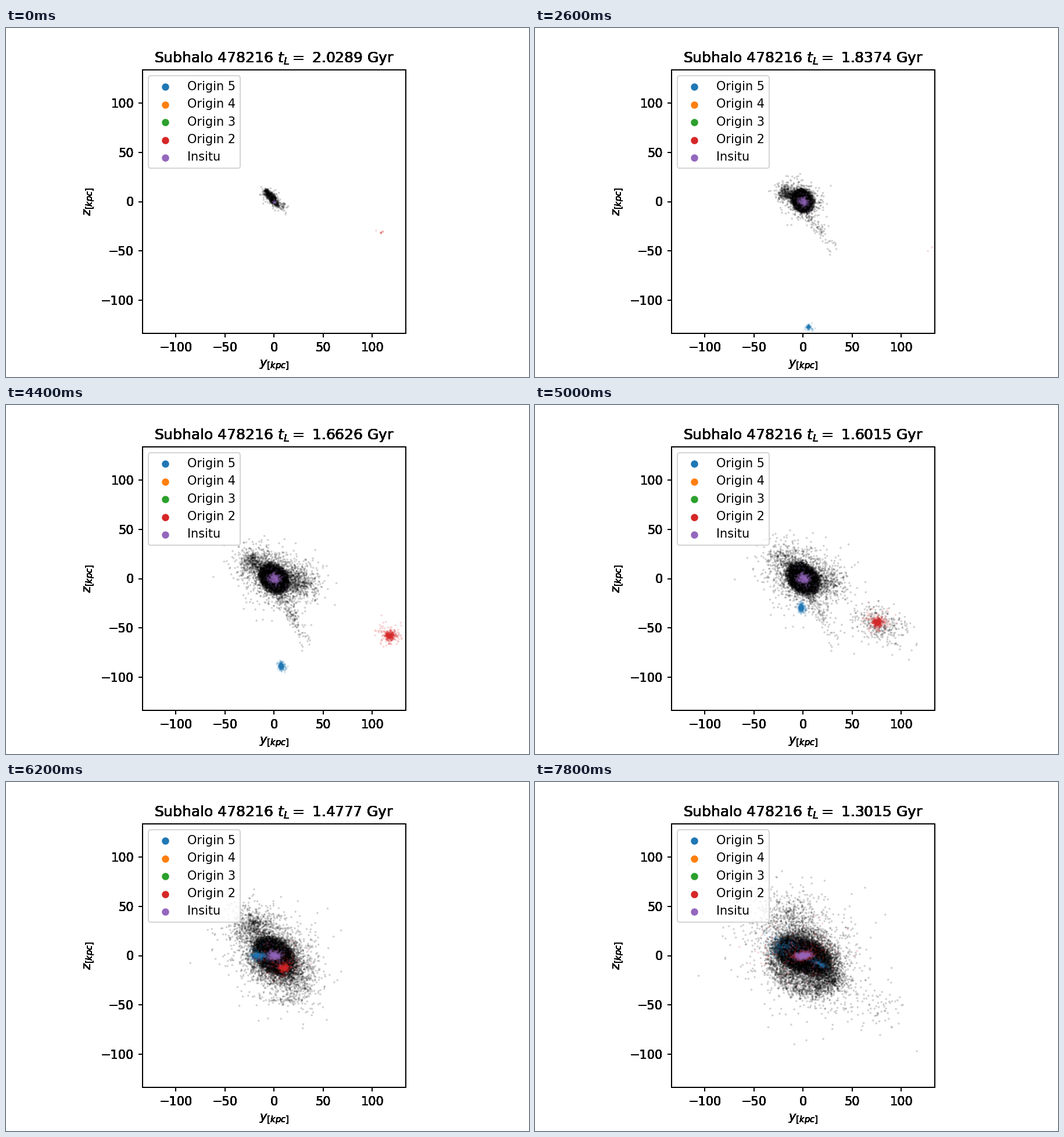
Write a matplotlib script that moves like this. It is 900 px wide and 600 px high and loops after 8 s.

```python
import numpy as np
import matplotlib.pyplot as plt
from matplotlib.animation import FuncAnimation

FRAMES, STEP_MS = 40, 200
LAST = FRAMES - 1
LIMIT = 134
PANEL = [234.75 / 900, 75 / 600, 453 / 900, 453 / 600]
TICKS = range(-100, 101, 50)
BLUE, ORANGE, GREEN, RED, PURPLE = (f"C{i}" for i in range(5))
rng = np.random.default_rng(478216)


def ease(f, start, end):
    s = np.clip((f - start) / (end - start), 0, 1)
    return s * s * (3 - 2 * s)


def bump(f, peak, width):
    return np.exp(-((f - peak) / width) ** 2)


def path(*keys):
    """Smooth curve through (frame, x, y) key points."""
    keys = np.array(keys, float)
    t, pos = keys[:, 0], keys[:, 1:]
    slope = np.gradient(pos, t, axis=0)

    def at(f):
        i = min(np.searchsorted(t, f, side="right") - 1, len(t) - 2)
        h = t[i + 1] - t[i]
        s = (f - t[i]) / h
        blend = s * s * (3 - 2 * s)
        return (pos[i] + blend * (pos[i + 1] - pos[i])
                + h * s * (1 - s) * ((1 - s) * slope[i] - s * slope[i + 1]))
    return at


class Cloud:
    """Orbiting particles; rule(f) gives count, centre, two radii and tilt."""

    def __init__(self, rule, disc=False, spin=0.05, size=8000):
        self.rule = rule
        if disc:
            self.r = rng.random(size) ** 0.6 * (1 + 0.1 * rng.standard_normal(size))
        else:
            self.r = np.hypot(*rng.standard_normal((2, size)))
            self.r *= np.exp(0.15 * rng.standard_normal(size))
        self.phase = rng.random(size) * 2 * np.pi
        self.rate = spin / (0.4 + self.r)

    def points(self, f):
        n, centre, rx, ry, tilt = self.rule(f)
        n = int(n)
        th = self.phase[:n] + self.rate[:n] * f
        u, v = rx * self.r[:n] * np.cos(th), ry * self.r[:n] * np.sin(th)
        c, s = np.cos(np.radians(tilt)), np.sin(np.radians(tilt))
        return np.column_stack([c * u - s * v, s * u + c * v]) + centre


red_path = path((0, 110, -31), (8, 137, -41), (18, 135, -61), (22, 118, -58),
                (28, 31.5, -27.5), (34, 0, -1), (39, 0, 0))
blue_path = path((0, -2, -138), (8, 0.3, -128), (18, 9.5, -117), (22, 7.5, -89),
                 (28, -11, 20), (34, -13.5, -30), (39, 17, -8))
plume_path = path((0, -6, 8), (18, -19, 11), (28, -21, 25), (39, -14, 38))


# the main galaxy and its surroundings
def body(f):
    p = f / LAST
    return (500 + 160 * f, np.array([-2.5, 4]) * (1 - p) ** 4, 11 + 19 * p**2,
            4 + 13 * p**0.6 + 4 * bump(f, 34, 3), -50 + 28 * p**3)


def shell(f):
    p = f / LAST
    return 3600 * p**5, (2 * p, -7 * p**3), 39 * p, 34 * p, -28


def halo(f):
    size = 5 + 27 * (f / LAST) ** 1.4
    return 40 + 900 * ease(f, 0, 26), (-2, 3), size, 0.8 * size, -32


def plume(f):
    size = 3 + 14 * (f / LAST) ** 2
    n = 60 + 650 * bump(f, 18, 5) + 850 * bump(f, 34, 4) + 250 * ease(f, 22, 39)
    return n, plume_path(f), size, 0.9 * size, -35


def knot(f):
    return 130 * (bump(f, 18, 4) + bump(f, 34, 3)), plume_path(f) + (-2, 5), 2.5, 2.3, 0


# debris thrown out at each close passage
def tail(f):
    reach = min(f / 18, 1)
    n = 45 + 185 * bump(f, 19, 5)
    return n, (8 + 7 * reach, -5 - 27 * reach), 3 + 15 * reach, 2.5 + reach, -25 - 37 * reach


def fan(f):
    return 800 * bump(f, 22.5, 3), (21, -3), 12, 9, -10


def flank(f):
    return 650 * ease(f, 30, 34), (25, -27 + 8 * ease(f, 34, 39)), 10, 9, -45


def arc(f):
    return 340 * bump(f, 34, 2.5), (14, -45), 14, 3, -2


def strays(f):
    return 75 * ease(f, 32, 39), (72, -50), 20, 12, -30


def escort(f):
    return 950 * ease(f, 23, 28) * (1 - ease(f, 30, 34)), red_path(f) + (2, -2), 14, 9, -22


# infalling satellites
def blue_core(f):
    p = f / LAST
    x, y = blue_path(f)
    n = 260 * ease(f, 4, 28) - 150 * ease(f, 34, 39)
    return n, (x, y), 1 + 3.5 * p**2, 1 + 0.6 * p, np.degrees(np.arctan2(y, x))


def blue_rest(f):
    spread = ease(f, 26, 36)
    n = 8 * ease(f, 3, 8) + 20 * ease(f, 8, 18) + 170 * spread
    return n, blue_path(f) * (1 - 2.2 * ease(f, 31, 39)), 3 + 6 * spread, 3 + 4 * spread, 0


def red_core(f):
    merged = ease(f, 30, 34)
    n = 6 + 280 * ease(f, 16, 22)
    return n, red_path(f), 0.7 + 1.9 * ease(f, 0, 14) + 3 * merged, 0.7 + 1.4 * ease(f, 0, 14), 6


def red_rest(f):
    loose = ease(f, 29, 34)
    n = 3 + 14 * ease(f, 0, 8) + 100 * ease(f, 16, 22) + 60 * loose
    centre = red_path(f) + np.array([-12, 12]) * bump(f, 34, 3)
    return n, centre, 3 + 4 * ease(f, 0, 8) + 14 * loose, 1 + 5 * ease(f, 0, 8) + 9 * loose, -10


# stars born in place
def insitu(f):
    p = f / LAST
    return 16 + 450 * p, (0.3, -0.2), 0.9 + 3.3 * p**0.6, 0.8 + 1.8 * np.sin(2.6 * p), -45 + 50 * p**2


def outliers(f):
    p = f / LAST
    return 60 * p, (0, 0), 4 + 9 * p, 4 + 4 * p, -30


LAYERS = [
    ("black", [Cloud(body, True, 0.25), Cloud(shell, True, 0.15), Cloud(tail, spin=0.01)]
     + [Cloud(rule) for rule in (halo, plume, knot, fan, flank, arc, strays, escort)]),
    (BLUE, [Cloud(blue_core), Cloud(blue_rest)]),
    (RED, [Cloud(red_core), Cloud(red_rest)]),
    (PURPLE, [Cloud(insitu), Cloud(outliers)]),
]

fig = plt.figure(figsize=(6, 4), dpi=150, facecolor="white")


def panel():
    ax = fig.add_axes(PANEL, facecolor="none")
    ax.set(xlim=(-LIMIT, LIMIT), ylim=(-LIMIT, LIMIT), xticks=TICKS, yticks=TICKS,
           xlabel="$y_{[kpc]}$", ylabel="$z_{[kpc]}$")
    return ax


# stacked panels give the heavy axis and title lettering
panels = [panel() for _ in range(12)]
ax = panels[0]
titles = [p.set_title("") for p in panels]

dots = [ax.scatter([], [], s=1.2, facecolors="none", edgecolors=color,
                   linewidths=0.3, alpha=0.38, zorder=2) for color, _ in LAYERS]
for color, name in zip((BLUE, ORANGE, GREEN, RED, PURPLE),
                       ("Origin 5", "Origin 4", "Origin 3", "Origin 2", "Insitu")):
    ax.scatter([], [], s=36, color=color, linewidths=0, label=name)
ax.legend(loc="upper left")


def lookback(f):
    return np.interp(f, [0, 8, 18, 22, 28, 34, 39],
                     [2.0289, 1.9314, 1.7433, 1.6626, 1.5404, 1.415, 1.3015])


def update(f):
    label = f"Subhalo 478216 $t_L = $ {round(float(lookback(f)), 4)} Gyr"
    for title in titles:
        title.set_text(label)
    for dot, (_, clouds) in zip(dots, LAYERS):
        dot.set_offsets(np.vstack([c.points(f) for c in clouds]))
    return dots + titles


anim = FuncAnimation(fig, update, frames=FRAMES, interval=STEP_MS,
                     init_func=lambda: update(0), repeat=True, repeat_delay=0)
plt.show()
```
